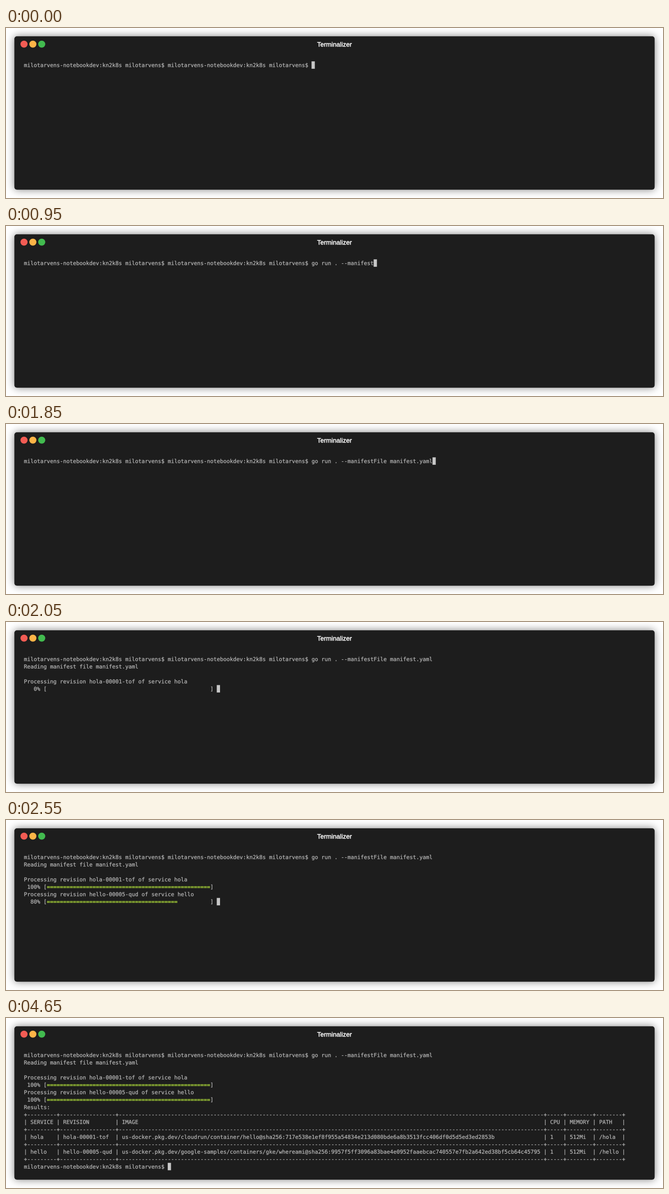
These frames come from a looping animation (1280 px wide and 333 px high, 4700 ms). An HTML page with a canvas:

```html
<!DOCTYPE html>
<html lang="en">
<head>
<meta charset="utf-8">
<title>Terminal</title>
<style>
  html, body { margin: 0; width: 100%; height: 100%; overflow: hidden; background: #fff; }
  canvas { display: block; }
</style>
</head>
<body>
<canvas id="stage" width="1280" height="333"></canvas>
<script>
const W = 1280, H = 333, LOOP = 4700, TICK = 50;
const LEFT = 34.9, TOP = 65.3, CELL_W = 6.368, CELL_H = 14.56, BASELINE = 11.2;
const TEXT = '#afafaf', GREEN = '#b3e33b', CURSOR = '#c7c7c7';

const ctx = document.getElementById('stage').getContext('2d');
ctx.imageSmoothingQuality = 'high';

// Text is drawn enlarged and scaled down, so glyphs keep fractional positions.
const SCALE = 4;
const layer = document.createElement('canvas');
layer.width = W * SCALE;
layer.height = H * SCALE;
const ink = layer.getContext('2d');
ink.scale(SCALE, SCALE);
ink.lineJoin = 'round';

const user = 'milotarvens';
const prompt = `${user}-notebookdev:kn2k8s ${user}$ `;
const command = 'go run . --manifestFile manifest.yaml';
const reading = 'Reading manifest file manifest.yaml';
const revisions = [['hola', 'hola-00001-tof'], ['hello', 'hello-00005-qud']];
const table = makeTable([
  ['SERVICE', 'REVISION', 'IMAGE', 'CPU', 'MEMORY', 'PATH'],
  [...revisions[0], 'us-docker.pkg.dev/cloudrun/container/hello@sha256:717e538e1ef8f955a54834e213d080bde6a8b3513fcc406df0d5d5ed3ed2853b', '1', '512Mi', '/hola'],
  [...revisions[1], 'us-docker.pkg.dev/google-samples/containers/gke/whereami@sha256:9957f5ff3096a83bae4e0952faaebcac740557e7fb2a642ed38bf5cb64c45795', '1', '512Mi', '/hello']
]);

function makeTable(rows) {
  const widths = rows[0].map((_, i) => Math.max(...rows.map(r => r[i].length)));
  const rule = '+' + widths.map(w => '-'.repeat(w + 2)).join('+') + '+';
  const lines = rows.map(r => '| ' + r.map((s, i) => s.padEnd(widths[i])).join(' | ') + ' |');
  return [rule, ...lines.flatMap(line => [line, rule])];
}

function processing([service, revision]) {
  return `Processing revision ${revision} of service ${service}`;
}

function bar(percent) {
  return `${String(percent).padStart(4)}% [${'='.repeat(percent / 2).padEnd(50)}] `;
}

// Screen lines at a tick; the cursor sits at the end of the last line.
function screen(tick) {
  const lines = [prompt + prompt + command.slice(0, tick)];
  if (tick < 38) return lines;
  if (tick === 38) return [...lines, ''];
  lines.push(reading, '');
  if (tick === 39) return lines;
  lines.push(processing(revisions[0]));
  if (tick === 40) return [...lines, ''];
  lines.push(bar(Math.min(100, (tick - 41) * 20)));
  if (tick < 47) return lines;
  lines.push(processing(revisions[1]), bar(Math.min(100, (tick - 47) * 20)));
  if (tick < 53) return lines;
  return [...lines, 'Results:', ...table, tick < 93 ? '' : prompt];
}

function drawWindow() {
  const inset = 16.3;
  ctx.fillStyle = '#fff';
  ctx.fillRect(0, 0, W, H);
  ctx.save();
  ctx.shadowColor = 'rgba(0,0,0,.5)';
  ctx.shadowBlur = 16;
  ctx.fillStyle = '#1d1d1d';
  ctx.beginPath();
  ctx.roundRect(inset, inset, W - 2 * inset, H - 2 * inset, 5);
  ctx.fill();
  ctx.restore();

  ['#f25c54', '#fdb447', '#42bb4f'].forEach((color, i) => {
    ctx.fillStyle = color;
    ctx.beginPath();
    ctx.arc(35.1 + i * 17.25, 31.6, 6.95, 0, Math.PI * 2);
    ctx.fill();
  });
}

function write(text, x, y, color, weight) {
  ink.fillStyle = ink.strokeStyle = color;
  ink.lineWidth = weight;
  ink.fillText(text, x, y);
  ink.strokeText(text, x, y);
}

function drawLine(line, row) {
  const y = TOP + row * CELL_H + BASELINE;
  [...line].forEach((ch, col) => {
    if (ch !== ' ') write(ch, LEFT + col * CELL_W, y, ch === '=' ? GREEN : TEXT, 0.3);
  });
}

function draw(tick) {
  drawWindow();
  ink.clearRect(0, 0, W, H);

  ink.font = '12.55px "Liberation Sans", Arial, sans-serif';
  ink.textAlign = 'center';
  write('Terminalizer', W / 2, 36.4, '#fff', 0.45);

  ink.font = '10.58px "DejaVu Sans Mono", monospace';
  ink.textAlign = 'left';
  const lines = screen(tick);
  lines.forEach(drawLine);
  const row = lines.length - 1;
  ink.fillStyle = CURSOR;
  ink.fillRect(LEFT + lines[row].length * CELL_W, TOP + row * CELL_H, CELL_W, CELL_H);

  ctx.drawImage(layer, 0, 0, W, H);
}

const start = performance.now();
let shown = -1;

function frame() {
  const tick = Math.floor(((performance.now() - start) % LOOP) / TICK);
  if (tick !== shown) draw(shown = tick);
  requestAnimationFrame(frame);
}
frame();
</script>
</body>
</html>
```
